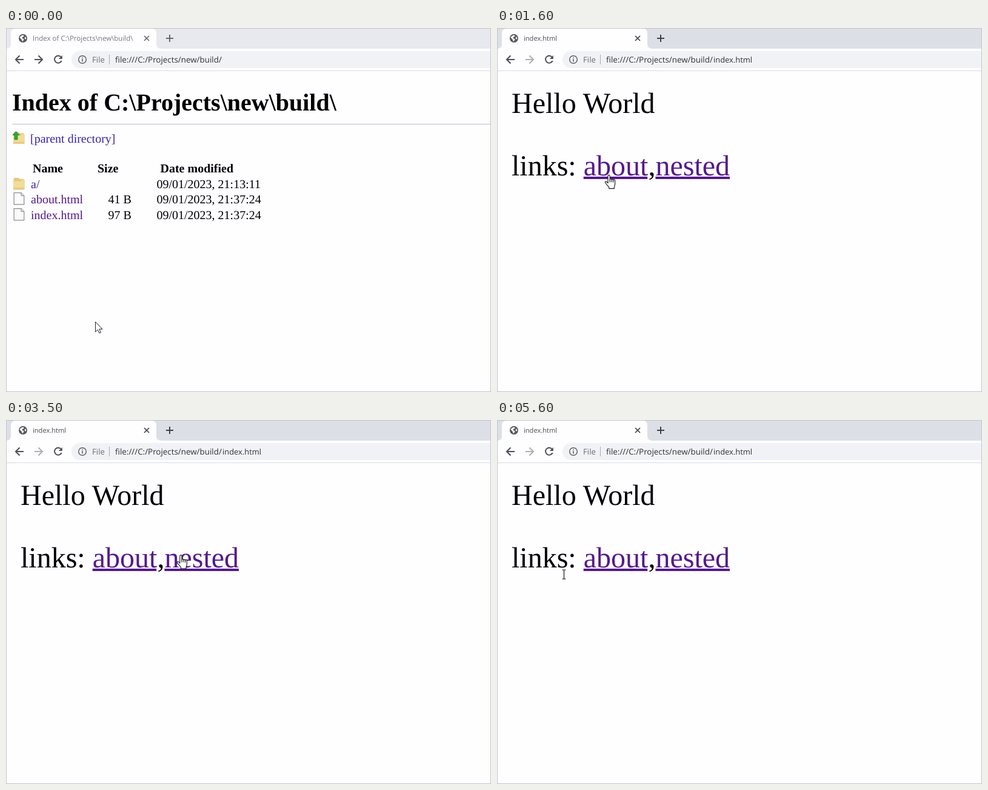
Animation, 800 px wide and 600 px high, one loop 5700 ms. Source, as an HTML page:

```html
<!DOCTYPE html>
<html lang="en">
<head>
<meta charset="utf-8">
<title>Directory browsing</title>
<style>
  html, body { margin: 0; width: 100%; height: 100%; overflow: hidden; background: #fefdff; }
  svg { display: block; width: 800px; height: 600px; }
  text { text-rendering: geometricPrecision; }
  .ui { font-family: "Open Sans", "Noto Sans", sans-serif; }
  .list { font: 20px "Liberation Serif", "Times New Roman", serif; }
  .big { font: 48px "Liberation Serif", "Times New Roman", serif; }
  .bold { font-weight: bold; }
  .link { color: #551a8b; fill: currentColor; }
  .fresh { fill: #3b25a6; }
  .pressed { color: #e80518; }
  .line { fill: none; stroke: #4c4f54; stroke-width: 2; }
</style>
</head>
<body>
<svg viewBox="0 0 800 600">
  <defs>
    <g id="folder">
      <path d="M1 2.5Q1 1 2.5 1H9L11 3H17Q18.500 3 18.500 4.500V19H1Z" fill="#e3c878"/>
      <path d="M10 5H19V20H10Z" fill="#d9bd6b"/>
      <path d="M.5 6.500H12L14 4.500H18.500V18L16 20.500H.5Z" fill="#f1dc98"/>
      <path d="M.5 17H17.500V20.500H.5Z" fill="#e6cc83"/>
    </g>
    <g id="file">
      <path d="M.7 .7H12.500L17.300 5.500V19.800H.7Z" fill="#fafafb" stroke="#8c8c90" stroke-width="1.200"/>
      <path d="M12.500 .7V5.500H17.300" fill="#e2e2e5" stroke="#8c8c90"/>
    </g>
    <path id="back" class="line" d="M7 0H-6M.5-6.500L-6 0L.5 6.500"/>
  </defs>

  <rect width="800" height="600" fill="#fefdff"/>
  <rect id="strip" width="800" height="34" fill="#dcdfe6"/>
  <path d="M0 34Q8 34 8 26V9Q8 1 16 1H240Q248 1 248 9V26Q248 34 256 34Z" fill="#fefdff"/>
  <g transform="translate(28 17)">
    <circle r="7" fill="#55585d"/>
    <path d="M-5.500-1.500Q-3-5.500 1-5.300L1.500-3L-1-2L-1.500 0L1.500 1L1 3L-1 5.500L-2 2.500Z" fill="#fefdff"/>
    <path d="M3-4.300Q5.500-2 5.400 1L3.500 1.500L2.500-.5L4-2Z" fill="#fefdff"/>
  </g>
  <g class="ui">
    <text id="title" x="44" y="21"></text>
    <text x="142" y="57" font-size="13.2" fill="#6b6e73">File</text>
    <text x="180" y="57" font-size="13.4" fill="#303236">file:///C:/Projects/new/build/</text>
  </g>
  <g id="tabMarks" fill="none" stroke="#3f4247">
    <path d="M228 13L236 21M236 13L228 21" stroke-width="1.700"/>
    <path d="M264 17H276M270 11V23" stroke-width="2"/>
  </g>
  <use href="#back" x="22" y="52"/>
  <use id="forward" href="#back" transform="translate(54 52) scale(-1 1)"/>
  <path class="line" d="M90.800 48A6 6 0 1 0 91.600 54"/>
  <path d="M92.800 45V51H86.800Z" fill="#4c4f54"/>
  <rect x="108" y="38" width="720" height="28" rx="14" fill="#f1f2f5"/>
  <g id="omni" class="ui">
    <circle cx="126" cy="52" r="6.300" fill="none" stroke="#5f6368" stroke-width="1.500"/>
    <path d="M126 51V55.500M126 48.300V49.800" stroke="#5f6368" stroke-width="1.600"/>
    <text x="142" y="57" font-size="13.2" fill="#6b6e73">File</text>
    <path d="M170.500 44V60" stroke="#a9abb0"/>
    <text x="180" y="57" font-size="13.4" fill="#303236">file:///C:/Projects/new/build/</text>
    <text id="tail" x="357" y="57" font-size="12.9" fill="#303236"></text>
  </g>
  <path d="M0 70.500H800" stroke="#dadbdf"/>

  <g id="dir" class="list">
    <text class="bold" x="10" y="135.500" style="font-size:40px">Index of C:\Projects\new\build\</text>
    <path d="M10 158.500H800" stroke="#bfbfc2"/>
    <use href="#folder" x="11.500" y="170.500"/>
    <path d="M16.500 170.500L22 176.500H19V184H14V176.500H11Z" fill="#34a53a" stroke="#22832c" stroke-width=".8"/>
    <text class="fresh" x="40" y="189">[parent directory]</text>
    <g class="bold">
      <text x="44" y="238">Name</text>
      <text x="151" y="238">Size</text>
      <text x="254.500" y="238">Date modified</text>
    </g>
    <use href="#folder" x="11.500" y="246"/>
    <text class="fresh" x="41" y="264">a/</text>
    <text x="248.500" y="264">09/01/2023, 21:13:11</text>
    <use href="#file" x="12.500" y="271"/>
    <text class="link" x="41" y="289">about.html</text>
    <text x="168.500" y="289">41 B</text>
    <text x="248.500" y="289">09/01/2023, 21:37:24</text>
    <use href="#file" x="12.500" y="297"/>
    <g id="openIndex" class="link">
      <text x="41" y="315">index.html</text>
      <rect id="hoverLine" x="41" y="316" width="86" height="2"/>
    </g>
    <text x="168.500" y="315">97 B</text>
    <text x="248.500" y="315">09/01/2023, 21:37:24</text>
  </g>

  <g id="index" class="big">
    <text x="24" y="139.500">Hello World</text>
    <text x="24" y="242.500">links:</text>
    <g id="toAbout" class="link">
      <text x="142.700" y="242.500">about</text>
      <rect x="142.700" y="245" width="105.500" height="4"/>
    </g>
    <text x="249.400" y="242.500">,</text>
    <g id="toNested" class="link">
      <text x="261.400" y="242.500">nested</text>
      <rect x="261.400" y="245" width="122.600" height="4"/>
    </g>
  </g>

  <g id="sub" class="big">
    <text id="heading" x="24" y="139.500"></text>
    <g id="toHome" class="link">
      <text x="24" y="242.500">home</text>
      <rect x="24" y="245" width="106.700" height="4"/>
    </g>
  </g>

  <g id="cursor">
    <path id="arrow" d="M.5 .5V17L4.300 13.400L7 19L9.400 18L6.900 12.300H12Z" fill="#fff" stroke="#222" stroke-linejoin="round"/>
    <g id="hand" transform="translate(-7 -.3)" stroke="#1c1c1f" stroke-width="1.150" stroke-linejoin="round">
      <path fill="#fff" d="M5.500 14V2.200a1.600 1.600 0 0 1 3.200 0V8a1.500 1.500 0 0 1 2.900 .5a1.500 1.500 0 0 1 2.800 .7a1.400 1.400 0 0 1 2.700 .8V15.500C17.100 18 15.800 19 15.800 21V23H7.200V21C6 18.500 2.700 15.800 1.200 13.300C.3 11.800 2 10.600 3.300 11.700Z"/>
      <path fill="none" d="M8.700 8V12.500M11.600 8.500V12.500M14.400 9.200V12.800"/>
    </g>
    <path id="beam" d="M-3-7.500H-1Q0-7.500 0-6.500Q0-7.500 1-7.500H3M0-6.500V6.500M-3 7.500H-1Q0 7.500 0 6.500Q0 7.500 1 7.500H3" fill="none" stroke="#1c1c1f" stroke-width="1.200"/>
  </g>

  <rect x=".5" y=".5" width="799" height="599" fill="none" stroke="#c3c4c8"/>
</svg>
<script>
const LOOP = 5700, STEP = 100;
const $ = id => document.getElementById(id);

// Each row holds from its time until the next one.
const pages = [
  [0, 'dir'], [800, 'index'], [2000, 'about'],
  [3000, 'index'], [4000, 'nested'], [4900, 'index']
];
const shapes = [
  [0, 'arrow'], [600, 'hand'], [900, 'arrow'], [1500, 'hand'],
  [2400, 'arrow'], [2500, 'hand'], [3300, 'beam'], [3400, 'hand'],
  [4100, 'arrow'], [4400, 'hand'], [5200, 'beam']
];
const presses = [
  [700, 'openIndex'], [1900, 'toAbout'], [2900, 'toHome'],
  [3900, 'toNested'], [4800, 'toHome']
];
// Pointer moves: start, end, target x, target y.
const moves = [
  [0, 600, 84, 314], [1200, 1600, 184.5, 242], [2300, 2600, 68, 228],
  [3200, 3600, 303, 222], [4000, 4500, 98, 219.5], [5300, 5600, 110.5, 254.5]
];
const addresses = { dir: '', index: 'index.html', about: 'about.html', nested: 'a/nested.html' };

const ease = p => p < .5 ? 4 * p ** 3 : 1 - 4 * (1 - p) ** 3;
const current = (rows, t) => rows.filter(r => r[0] <= t).pop()[1];
const show = (id, on) => { $(id).style.display = on ? '' : 'none'; };

function pointer(t) {
  let x = 147, y = 484;
  for (const [from, to, tx, ty] of moves) {
    const p = ease(Math.min(1, Math.max(0, (t - from) / (to - from))));
    x += (tx - x) * p;
    y += (ty - y) * p;
  }
  return `translate(${x.toFixed(1)} ${y.toFixed(1)})`;
}

function draw(t) {
  const page = current(pages, t), shape = current(shapes, t);
  const isDir = page === 'dir', isSub = page === 'about' || page === 'nested';
  const focused = t >= 700;

  show('dir', isDir);
  show('index', page === 'index');
  show('sub', isSub);
  show('hoverLine', t >= 600);
  $('heading').textContent = page === 'about' ? 'About' : 'Nested';
  $('title').textContent = isDir ? 'Index of C:\\Projects\\new\\build\\' : page + '.html';
  $('title').setAttribute('font-size', isDir ? 11.5 : 11.1);
  $('title').setAttribute('fill', focused ? '#494c51' : '#74777c');
  $('tail').textContent = addresses[page];
  $('strip').setAttribute('fill', focused ? '#dcdfe6' : '#e8e9ee');
  $('tabMarks').setAttribute('stroke', focused ? '#3f4247' : '#66696e');
  $('forward').setAttribute('opacity', isDir ? 1 : .45);

  for (const [, id] of presses) $(id).classList.remove('pressed');
  const press = presses.find(([at]) => t >= at && t < at + STEP);
  if (press) $(press[1]).classList.add('pressed');

  for (const id of ['arrow', 'hand', 'beam']) show(id, id === shape);
  $('cursor').setAttribute('transform', pointer(t));
}

let last = -1;
function tick() {
  const t = Math.floor(performance.now() % LOOP / STEP) * STEP;
  if (t !== last) draw(last = t);
  requestAnimationFrame(tick);
}
tick();
</script>
</body>
</html>
```
